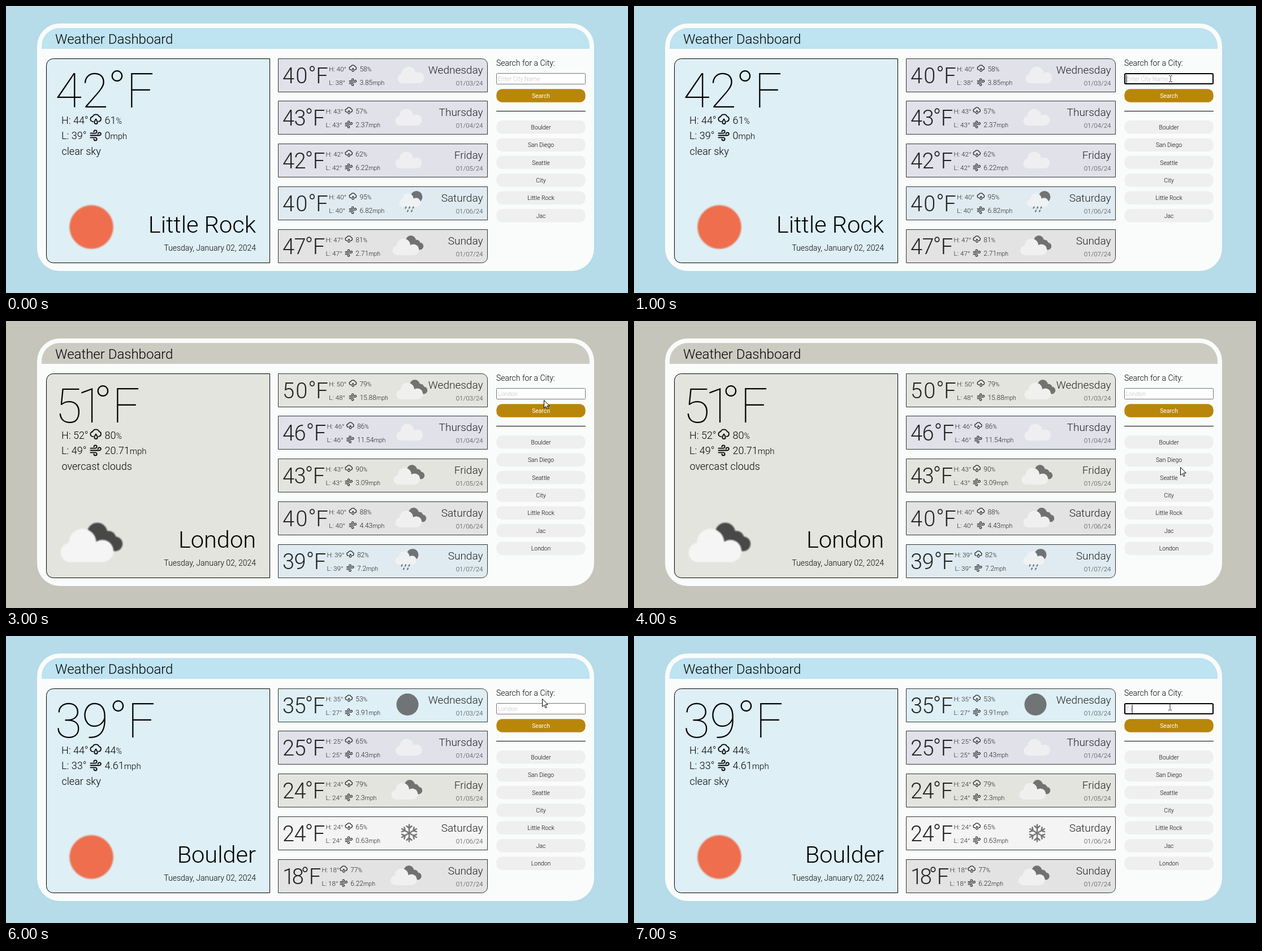
An HTML page for the animation above (8000 ms loop, 1100 by 509 pixels).

```html
<!DOCTYPE html>
<html lang="en">
<head>
<meta charset="utf-8">
<title>Weather Dashboard</title>
<style>
  html, body { margin: 0; width: 100%; height: 100%; overflow: hidden; }
  svg { display: block; width: 1100px; height: 509px; }
  text { font-family: Roboto, "Open Sans", sans-serif; font-weight: 300; fill: #000; white-space: pre; }
  .huge { font-size: 86px; font-weight: 100; }
  .temp { font-size: 38px; letter-spacing: -.5px; }
  .row text { fill: #222; }
  .row .date { fill: #444; }
  .row .icon { opacity: .73; }
  .big { filter: blur(.9px); }
  .line { fill: none; stroke: #000; stroke-width: 1.9; stroke-linecap: round; stroke-linejoin: round; }
  .row .line { stroke: #222; }
  .end { text-anchor: end; }
  .mid { text-anchor: middle; }
  .hint { fill: #c0c0c0; }
</style>
</head>
<body>
<svg id="stage" viewBox="0 0 1100 509"></svg>
<script>
const INK = '#484848', SUN = '#ee6e4d', WHITE = '#f5f5f5';
const DAYS = ['Wednesday', 'Thursday', 'Friday', 'Saturday', 'Sunday'];
const CITIES = ['Boulder', 'San Diego', 'Seattle', 'City', 'Little Rock', 'Jac', 'London'];
const BLUE = ['#b6dbe9', '#bee3f1', '#deeff6'];

// rows: temperature, low, humidity, wind, sky, icon centre
const SCENES = [
  { city: 'Little Rock', colors: BLUE, temp: '42', edge: 260, hi: 44, lo: 39, hum: 61, wind: '0',
    sky: 'clear sky', icon: 'sun',
    rows: ['40 38 58 3.85 cloud 716', '43 43 57 2.37 cloud 712', '42 42 62 6.22 cloud 712',
           '40 40 95 6.82 rain 716', '47 47 81 2.71 broken 711'] },
  { city: 'London', colors: ['#c5c5bb', '#cbcbc2', '#e4e4de'], temp: '51', edge: 235, hi: 52, lo: 49, hum: 80, wind: '20.71',
    sky: 'overcast clouds', icon: 'broken',
    rows: ['50 48 79 15.88 overcast 718', '46 46 86 11.54 cloud 714', '43 43 90 3.09 overcast 713',
           '40 40 88 4.43 broken 716', '39 39 82 7.2 rain 709'] },
  { city: 'Seattle', colors: ['#cdcdcd', '#d4d4d4', '#e8e8e7'], temp: '43', edge: 260, hi: 48, lo: 39, hum: 90, wind: '6.91',
    sky: 'mist', icon: 'mist',
    rows: ['43 42 92 1.52 shower 711', '46 46 84 2.3 broken 711', '43 43 92 5.28 shower 713',
           '45 45 81 12.21 shower 713', '40 40 80 5.79 shower 716'] },
  { city: 'Boulder', colors: BLUE, temp: '39', edge: 262, hi: 44, lo: 33, hum: 44, wind: '4.61',
    sky: 'clear sky', icon: 'sun',
    rows: ['35 27 53 3.91 night 710', '25 25 65 0.43 cloud 712.5', '24 24 79 2.3 overcast 709',
           '24 24 65 0.63 snow 713', '18 18 77 6.22 broken 707.5'] }
];
const SKY = { cloud: '#e1e1ea', rain: '#dfebf1', shower: '#dfebf1', broken: '#e3e3e3',
              overcast: '#e4e4df', night: '#deeff6', snow: '#f4f4f4' };

// one entry per second
const STEPS = [
  { scene: 0, text: 'Enter City Name' },
  { scene: 0, text: 'Enter City Name', focus: true, caret: 871, beam: [949, 129] },
  { scene: 0, text: 'London', focus: true, beam: [951, 129] },
  { scene: 1, text: 'London', arrow: [951, 140] },
  { scene: 1, text: 'London', arrow: [966, 259] },
  { scene: 2, text: 'London', arrow: [954, 222] },
  { scene: 3, text: 'London', arrow: [948, 111] },
  { scene: 3, text: 'Ta', focus: true, caret: 881, beam: [948, 126] }
];

const text = (x, y, size, s, cls = '', extra = '') =>
  `<text x="${x}" y="${y}" class="${cls}" ${size ? `font-size="${size}"` : ''} ${extra}>${s}</text>`;
const disc = (x, y, r, fill, extra = '') => `<circle cx="${x}" cy="${y}" r="${r}" fill="${fill}" ${extra}/>`;
const box = (x, y, w, h, r, fill, extra = '') =>
  `<rect x="${x}" y="${y}" width="${w}" height="${h}" rx="${r}" fill="${fill}" ${extra}/>`;
const at = (x, y, k, body, cls = '') => `<g class="${cls}" transform="translate(${x} ${y}) scale(${k})">${body}</g>`;
const unit = (n, u, size) => `${n}<tspan font-size="${size}">${u}</tspan>`;

// rectangle with its own radius at each corner, clockwise from top left
function card(x, y, w, h, [a, b, c, d], attrs) {
  return `<path ${attrs} d="M${x + a} ${y}h${w - a - b}a${b} ${b} 0 0 1 ${b} ${b}v${h - b - c}
    a${c} ${c} 0 0 1 ${-c} ${c}h${c + d - w}a${d} ${d} 0 0 1 ${-d} ${-d}v${a + d - h}a${a} ${a} 0 0 1 ${a} ${-a}z"/>`;
}

const cloud = disc(-4, -3, 12, WHITE) + disc(13.5, 4.7, 9.8, WHITE) + disc(-15, 6, 8.5, WHITE) +
  box(-15, 2, 29, 12.5, 0, WHITE);

function rain(color) {
  const drops = [[-9, 8], [-2.5, 8], [4, 8], [-5.5, 14], [1.5, 14]]
    .map(([x, y]) => `M${x + .5} ${y - 1}l-1 2`).join('');
  return disc(10, -11, 10.5, color) + at(-1.7, -5, .81, cloud) +
    `<path d="${drops}" stroke="${INK}" stroke-width="2.2" stroke-linecap="round"/>`;
}

function snow() {
  let arms = '';
  for (let a = 0; a < 360; a += 60)
    arms += `<path transform="rotate(${a})" d="M0 0V-15M-4.5 -12.5L0 -8.5L4.5 -12.5"/>`;
  return `<g fill="none" stroke="${INK}" stroke-width="2.5" stroke-linecap="round">${arms}</g>`;
}

function mist() {
  const bars = [[132, 160], [113, 165], [130, 193], [108, 171], [121, 184], [130, 171]];
  return bars.map(([a, b], i) => box(a, 365.8 + i * 9.6, b - a, 4.6, 2, '#55555b')).join('');
}

const ICONS = {
  cloud,
  rain: rain(INK),
  shower: rain(SUN),
  broken: disc(5, -9.5, 8.9, INK) + disc(14.8, -4.3, 6.8, INK) + disc(20.8, .4, 6.5, INK) + at(-4, 2, 1, cloud),
  night: disc(0, -1, 19.5, INK),
  snow: snow()
};
ICONS.overcast = ICONS.broken;

const humidity = '<path class="line" d="M-5 3a4.5 4.5 0 0 1-1-9 6.5 6.5 0 0 1 12 0 4.6 4.6 0 0 1-1 9' +
  'M0-1.5c2.2 3 2.8 4.4 2.8 6.2a2.8 2.8 0 0 1-5.6 0C-2.8 2.9-2.2 1.5 0-1.5z"/>';
const wind = '<path class="line" d="M-10-3.5h9a2.7 2.7 0 1 0-2.7-2.7M-10 .5H6.5a2.7 2.7 0 1 0-2.7-2.7' +
  'M-10 4.5h9a2.7 2.7 0 1 1-2.7 2.7"/>';

// digits from the left, unit against the right edge; 1 sits tight and 0 loose
function degrees(left, right, y, n, cls) {
  const kern = n.includes('1') ? -.1 : n.includes('0') ? .07 : 0;
  return text(left, y, 0, n, cls, `dx="0 ${kern}em"`) +
    text(right, y, 0, '<tspan dy="-.05em">°</tspan><tspan dy=".05em">F</tspan>', cls + ' end');
}

const advance = d => d === '0' ? 29.5 : d === '1' ? 15 : '689'.includes(d) ? 26 : 24;

function forecast(line, i) {
  const [temp, lo, hum, speed, sky, iconX] = line.split(' ');
  const y = 93.5 + Math.floor(i * 75.8);
  const x = 518 + advance(temp[0]) + advance(temp[1]);
  const mid = x + 40.5 + (x - 566) * .3;
  const corners = [0, i ? 0 : 10, i === 4 ? 10 : 0, 0];
  return '<g class="row">' +
    card(481.5, y, 370, 59, corners, `fill="${SKY[sky]}" stroke="#333"`) +
    degrees(489, x - 2.5, y + 43.5, temp, 'temp') +
    text(x - .5, y + 22.5, 11.7, `H: ${temp}°`) + text(x - .5, y + 46, 11.7, `L: ${lo}°`) +
    at(mid, y + 17.8, .64, humidity) + at(mid, y + 41.3, .64, wind) +
    text(mid + 11.8, y + 22.5, 12, unit(hum, '%', 10)) +
    text(mid + 11.8, y + 46, 12, unit(speed, 'mph', 10.5)) +
    at(iconX, y + 29, 1, ICONS[sky], 'icon') +
    text(843.5, y + 26, 19, DAYS[i], 'end') +
    text(843.5, y + 47.5, 11.6, `01/0${i + 3}/24`, 'end date') + '</g>';
}

function bigIcon(name) {
  const body = name === 'sun' ? disc(151, 392, 38.6, SUN, 'stroke="#dba184"') : name === 'mist' ? mist()
    : at(151.5, 394.5, 2, ICONS[name]);
  return `<g class="big">${body}</g>`;
}

function scene(s) {
  const [page, head, main] = s.colors;
  return box(0, 0, 1100, 509, 0, page) + box(55, 31, 985, 439, 40, '#f9fcfb') +
    card(63, 39, 969, 37, [32, 32, 0, 0], `fill="${head}"`) +
    text(87, 66.5, 24, 'Weather Dashboard') +
    card(71.5, 93.5, 395, 362, [12, 0, 0, 12], `fill="${main}" stroke="#000"`) +
    degrees(87, s.edge + 2, 180, s.temp, 'huge') +
    text(98, 208.5, 18, `H: ${s.hi}°`) + text(98, 236.3, 18, `L: ${s.lo}°`) +
    at(159, 202, .96, humidity) + at(159, 229, .96, wind) +
    text(174.5, 208.5, 18, unit(s.hum, '%', 14)) +
    text(174.5, 236.3, 18, unit(s.wind, 'mph', 15)) +
    text(98.5, 264, 18, s.sky) + bigIcon(s.icon) +
    text(442, 401.5, 41.5, s.city, 'end') +
    text(442, 434, 14, 'Tuesday, January 02, 2024', 'end') +
    s.rows.map(forecast).join('');
}

function sidebar(step) {
  const frame = step.focus
    ? box(868, 120, 156, 18, 1.5, '#fff', 'stroke="#000" stroke-width="2"')
    : box(867.5, 119.5, 157, 19, 1, '#fff', 'stroke="#767676"');
  const cities = CITIES.slice(0, step.scene ? 7 : 6).map((name, i) => {
    const y = 203 + i * 31.4;
    return box(867.3, y, 157.4, 23.5, 10, '#efefef') + text(946, y + 15.7, 10.4, name, 'mid');
  }).join('');
  return text(867, 105.5, 14, 'Search for a City:') + frame +
    text(870, 133, 10.5, step.text, 'hint') +
    (step.caret ? box(step.caret - .5, 122, 1, 15, 0, '#000') : '') +
    box(867.3, 147.3, 157.4, 23.4, 10, '#b8860b') +
    text(946, 163, 10.3, 'Search', 'mid', 'style="fill:#fff;font-weight:400"') +
    box(867, 186, 158, 1, 0, '#000') + cities;
}

function pointer({ arrow, beam }) {
  if (arrow) return at(...arrow, 1,
    '<path d="M.5.5V14.6L3.8 11.5 6.1 16.6 8.2 15.7 5.9 10.7H10.3z" fill="#fff" stroke="#000"/>');
  if (beam) return at(...beam, 1,
    '<path d="M-3-5.5H-1L0-4.5 1-5.5H3M0-4.5V4.5M-3 5.5H-1L0 4.5 1 5.5H3" fill="none" stroke="#222"/>');
  return '';
}

const stage = document.getElementById('stage');
stage.innerHTML = STEPS.map(step =>
  `<g visibility="hidden">${scene(SCENES[step.scene])}${sidebar(step)}${pointer(step)}</g>`).join('');
const views = [...stage.children];
const start = performance.now();
let shown = -1;

function tick() {
  const now = Math.floor((performance.now() - start) / 1000) % STEPS.length;
  if (now !== shown) {
    views.forEach((g, i) => g.setAttribute('visibility', i === now ? 'visible' : 'hidden'));
    shown = now;
  }
  requestAnimationFrame(tick);
}
tick();
</script>
</body>
</html>
```
